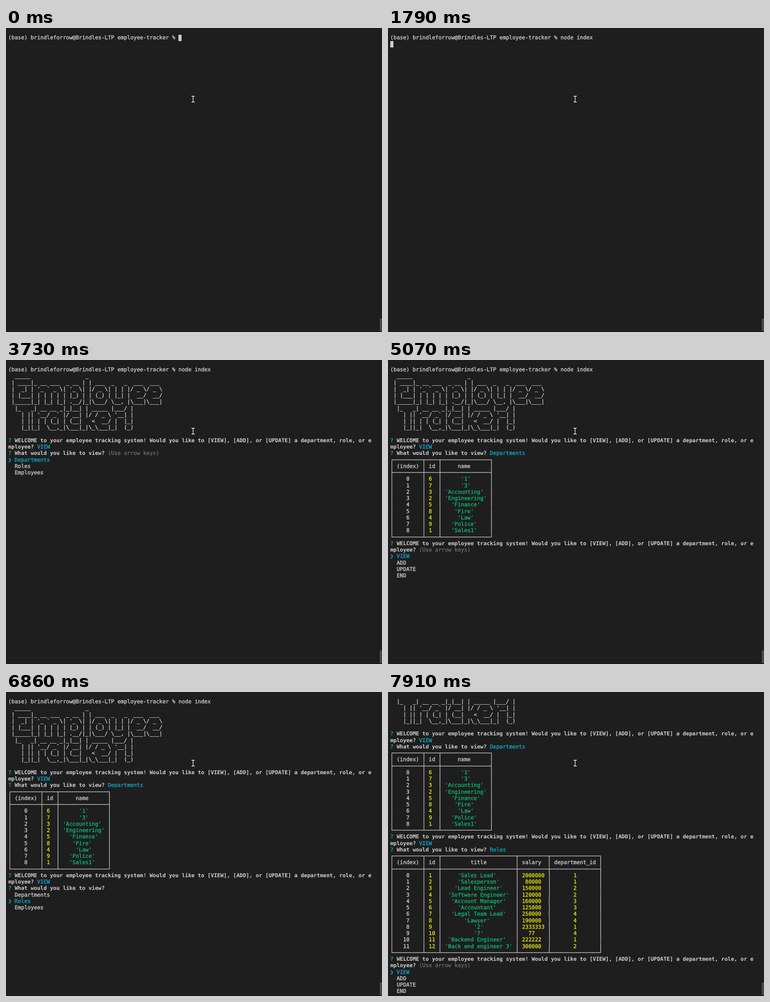
Animation, 833 px wide and 673 px high, one loop 8000 ms. Source, as an HTML page:

```html
<!DOCTYPE html>
<html lang="en">
<head>
<meta charset="utf-8">
<title>Employee tracker terminal</title>
<style>
  html, body { margin: 0; width: 100%; height: 100%; overflow: hidden; background: #1e1e1e; }
  #stage { position: relative; width: 833px; height: 673px; overflow: hidden; }
  #screen {
    position: absolute; left: 4.9px; top: 14px;
    font: 11.835px/14.25px "DejaVu Sans Mono", monospace;
    text-rendering: geometricPrecision;
    font-variant-ligatures: none;
    -webkit-text-stroke: .35px;
    white-space: pre; color: #d0d0d0;
  }
  #screen div { height: 14.25px; }
  b { font-weight: 700; -webkit-text-stroke: 0; }
  .green { color: #0dbc79; }
  .cyan { color: #11a8cd; }
  .yellow { color: #e5e510; }
  .grey { color: #6c6c6c; }
  .pointer { display: inline-block; width: 1ch; height: 14.25px; vertical-align: top; color: #11a8cd; }
  .cursor { position: absolute; width: 7.125px; height: 14.25px; margin-top: .9px; background: #ccc; }
  #thumb { position: absolute; left: 828px; top: 643px; width: 5px; height: 28px; background: #494949; }
  #edge { position: absolute; left: 0; top: 672px; width: 833px; height: 1px; background: #131313; }
  #mouse { position: absolute; left: 0; top: 0; }
</style>
</head>
<body>
<div id="stage">
  <div id="screen"></div>
  <div id="thumb"></div>
  <div id="edge"></div>
  <svg id="mouse" width="833" height="673">
    <path d="M411 151h2.3l1.2 1 1.2-1h2.3M414.5 152v11M411 164h2.3l1.2-1 1.2 1h2.3" fill="none" stroke="#fff" stroke-width="1.3"/>
  </svg>
</div>
<template id="banner">
  _____                 _
 | ____|_ __ ___  _ __ | | ___  _   _  ___  ___
 |  _| | '_ ` _ \| '_ \| |/ _ \| | | |/ _ \/ _ \
 | |___| | | | | | |_) | | (_) | |_| |  __/  __/
 |_____|_| |_| |_| .__/|_|\___/ \__, |\___|\___|
  |_   _| __ __ _|_|__| | _____ |___/ |
    | || '__/ _` |/ __| |/ / _ \ '__| |
    | || | | (_| | (__|   &lt;  __/ |  |_|
    |_||_|  \__,_|\___|_|\_\___|_|  (_)
</template>
<script>
const LOOP = 8000;
const paint = color => text => `<span class="${color}">${text}</span>`;
const green = paint('green'), cyan = paint('cyan'), yellow = paint('yellow'), grey = paint('grey');
const bold = text => `<b>${text}</b>`;
const cursor = '<i class="cursor"></i>';
const hint = grey('(Use arrow keys)');

const shell = command => '(base) brindleforrow@Brindles-LTP employee-tracker % ' + command;
const banner = document.getElementById('banner').content.textContent
  .slice(1).trimEnd().split('\n').map(line => line.replace(/</g, '&lt;'));

const welcome = tail => [
  green('?') + bold(' WELCOME to your employee tracking system! Would you like to ' +
    '[VIEW], [ADD], or [UPDATE] a department, role, or e'),
  bold('mployee?') + ' ' + tail
];
const view = tail => green('?') + bold(' What would you like to view?') + ' ' + tail;
const menu = (items, chosen = 0) => items.map((item, i) =>
  i === chosen ? paint('pointer')('❯') + cyan(' ' + item) : '  ' + item);
const actions = menu(['VIEW', 'ADD', 'UPDATE', 'END']);
const kinds = chosen => menu(['Departments', 'Roles', 'Employees'], chosen);

// Lays out rows the way console.table does: cells centred, spare space on the right.
function table(heads, records) {
  const quote = v => typeof v === 'string' ? `'${v}'` : String(v);
  const widths = heads.map((head, c) =>
    2 + Math.max(head.length, ...records.map(r => quote(r[c]).length)));
  const rule = (left, mid, right) => left + widths.map(w => '─'.repeat(w)).join(mid) + right;
  const centre = (text, c, color) => {
    const spare = widths[c] - text.length, left = spare >> 1;
    return ' '.repeat(left) + color(text) + ' '.repeat(spare - left);
  };
  const row = cells => '│' + cells.join('│') + '│';
  const plain = text => text;
  const colorOf = (v, c) => c === 0 ? plain : typeof v === 'string' ? green : yellow;
  return [
    rule('┌', '┬', '┐'),
    row(heads.map((head, c) => centre(head, c, plain))),
    rule('├', '┼', '┤'),
    ...records.map(r => row(r.map((v, c) => centre(quote(v), c, colorOf(v, c))))),
    rule('└', '┴', '┘')
  ];
}
const indexed = records => records.map((r, i) => [i, ...r]);

const departments = table(['(index)', 'id', 'name'], indexed([
  [6, '1'], [7, '3'], [3, 'Accounting'], [2, 'Engineering'], [5, 'Finance'],
  [8, 'Fire'], [4, 'Law'], [9, 'Police'], [1, 'Sales1']
]));
const roles = table(['(index)', 'id', 'title', 'salary', 'department_id'], indexed([
  ['Sales Lead', 2000000, 1], ['Salesperson', 80000, 1], ['Lead Engineer', 150000, 2],
  ['Software Engineer', 120000, 2], ['Account Manager', 160000, 3], ['Accountant', 125000, 3],
  ['Legal Team Lead', 250000, 4], ['Lawyer', 190000, 4], ['2', 2333333, 1],
  ['7', 77, 4], ['Backend Engineer', 222222, 1], ['Back end engineer 3', 300000, 2]
].map((r, i) => [i + 1, ...r])));

const started = [shell('node index'), ...banner, ''];
const viewing = [...started, ...welcome(cyan('VIEW'))];
const listed = [...viewing, view(cyan('Departments')), ...departments];
const again = [...listed, ...welcome(cyan('VIEW'))];
const chosenRoles = [...again, view(cyan('Roles'))];

const steps = [
  [0, [shell(cursor)]],
  [1050, [shell('clear' + cursor)]],
  [1190, [shell('node index' + cursor)]],
  [1790, [shell('node index'), cursor]],
  [2240, [...started, ...welcome(hint), ...actions]],
  [3730, [...viewing, view(hint), ...kinds(0)]],
  [5070, [...listed, ...welcome(hint), ...actions]],
  [6570, [...again, view(hint), ...kinds(0)]],
  [6860, [...again, view(''), ...kinds(1)]],
  [7760, [...chosenRoles, cursor]],
  [7910, [...chosenRoles, ...roles, ...welcome(hint), ...actions]]
];

const VISIBLE_ROWS = 46;
const screen = document.getElementById('screen');
let shown;
function draw() {
  const time = performance.now() % LOOP;
  const lines = steps.filter(([start]) => start <= time).pop()[1];
  if (lines !== shown) {
    shown = lines;
    screen.innerHTML = lines.slice(-VISIBLE_ROWS).map(line => `<div>${line}</div>`).join('');
  }
  requestAnimationFrame(draw);
}
draw();
</script>
</body>
</html>
```
